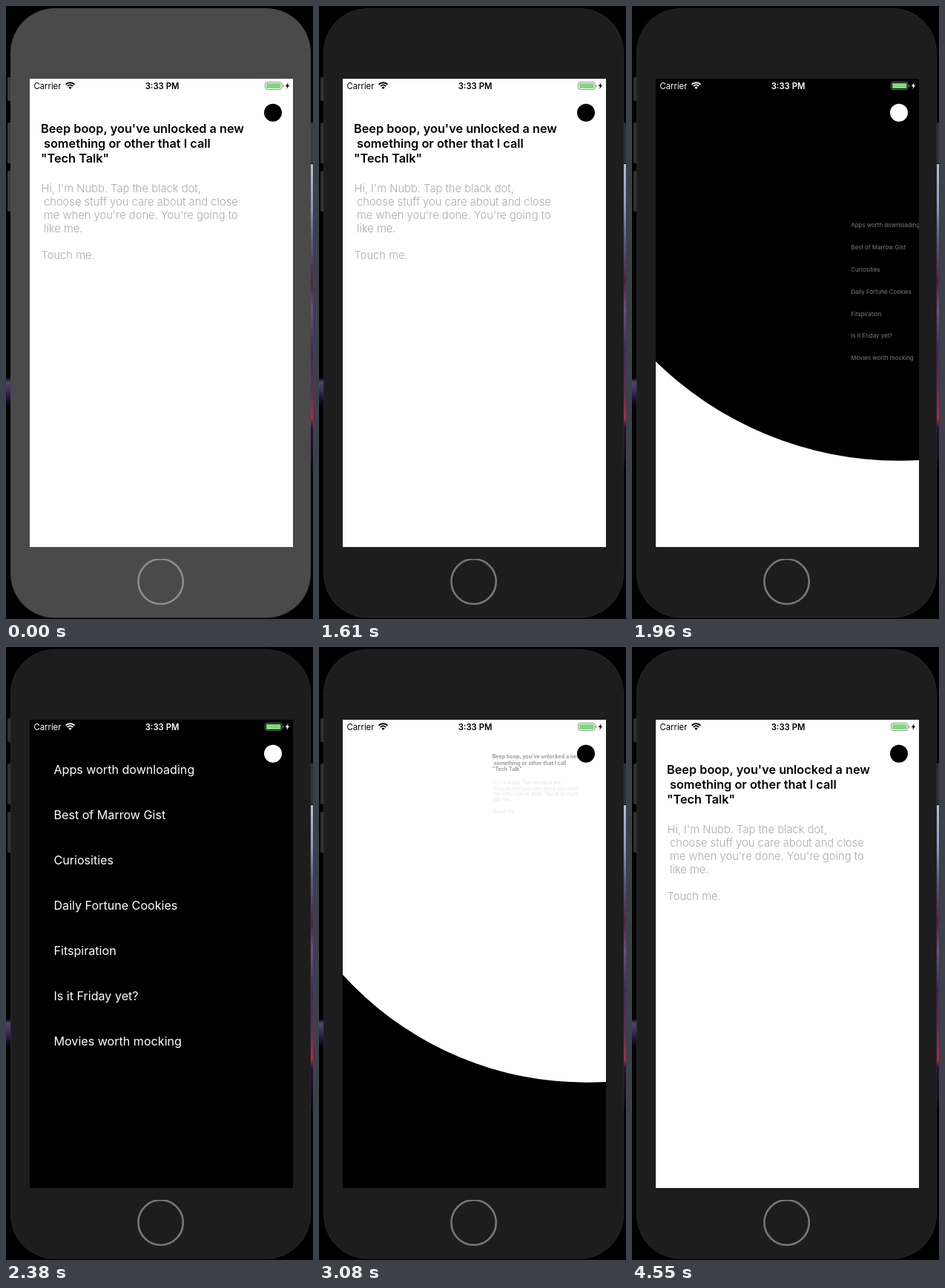
An HTML page with a canvas for the animation above (4.62 s loop, 414 by 826 pixels).

```html
<!DOCTYPE html>
<html lang="en">
<head>
<meta charset="utf-8">
<style>
  html, body { margin: 0; width: 100%; height: 100%; overflow: hidden; background: #000; }
  canvas { display: block; }
</style>
</head>
<body>
<canvas id="stage" width="414" height="826"></canvas>
<script>
const ctx = document.getElementById('stage').getContext('2d');
const LOOP = 4620;
const FOCUS_AT = 1610;
const OPEN_AT = 1802;
const CLOSE_AT = 2934;
const GROW = 350;
const DOT = { x: 360, y: 143.7, r: 12 };
const SCREEN = { x: 32, y: 98, w: 355, h: 631 };
const REACH = Math.hypot(DOT.x - SCREEN.x, SCREEN.y + SCREEN.h - DOT.y);
const FONT = 'Inter, "Open Sans", sans-serif';

const HEADING = ["Beep boop, you've unlocked a new", 'something or other that I call', '"Tech Talk"'];
const BODY = ["Hi, I'm Nubb. Tap the black dot,", 'choose stuff you care about and close',
  "me when you're done. You're going to", 'like me.', '', 'Touch me.'];
const TOPICS = ['Apps worth downloading', 'Best of Marrow Gist', 'Curiosities', 'Daily Fortune Cookies',
  'Fitspiration', 'Is it Friday yet?', 'Movies worth mocking'];

// Each page zooms in from, and back out to, its own fixed point.
const INTRO = { paper: '#fff', ink: '#000', from: { x: 378, y: 133.5 }, content: drawIntro };
const MENU = { paper: '#000', ink: '#fff', from: { x: 516, y: 420 }, content: drawMenu };

function label(text, x, y, size, weight, color, align = 'left') {
  ctx.font = `${weight} ${size}px ${FONT}`;
  ctx.textAlign = align;
  ctx.fillStyle = color;
  ctx.fillText(text, x, y);
}

function box(x, y, w, h, r, color) {
  ctx.beginPath();
  ctx.roundRect(x, y, w, h, r);
  ctx.fillStyle = color;
  ctx.fill();
}

function disc(x, y, r, color) {
  ctx.beginPath();
  ctx.arc(x, y, r, 0, Math.PI * 2);
  ctx.fillStyle = color;
  ctx.fill();
}

function strip(x, y, w, h, stops) {
  const g = ctx.createLinearGradient(0, y, 0, y + h);
  stops.forEach(([at, color]) => g.addColorStop(at, color));
  ctx.fillStyle = g;
  ctx.fillRect(x, y, w, h);
}

function drawIntro() {
  HEADING.forEach((line, i) => label(line, i === 1 ? 51 : 47, 171 + 20 * i, 16.3, 600, '#000'));
  BODY.forEach((line, i) => label(line, i > 0 && i < 4 ? 51 : 47.5, 251 + 18 * i, 14.73, 300, '#aaa'));
}

function drawMenu() {
  TOPICS.forEach((topic, i) => label(topic, 64.5, 171 + 61 * i, 16.1, 400, '#fff'));
}

function drawWifi(color) {
  ctx.strokeStyle = color;
  ctx.lineWidth = 2;
  for (const r of [8.4, 5.1]) {
    ctx.beginPath();
    ctx.arc(86.5, 111.7, r, -Math.PI * 0.75, -Math.PI * 0.25);
    ctx.stroke();
  }
  ctx.beginPath();
  ctx.moveTo(86.5, 112);
  ctx.arc(86.5, 112, 3, -Math.PI * 0.75, -Math.PI * 0.25);
  ctx.fillStyle = color;
  ctx.fill();
}

function drawBattery(color) {
  ctx.beginPath();
  ctx.roundRect(349.5, 102.5, 22.5, 10, 2.5);
  ctx.globalAlpha = 0.42;
  ctx.strokeStyle = color;
  ctx.lineWidth = 1;
  ctx.stroke();
  box(373, 106, 1.3, 3.4, 0.6, color);
  ctx.globalAlpha = 1;
  box(351, 104, 19.5, 7, 1, '#7fda78');
  ctx.beginPath();
  [[380.6, 103], [376.8, 108.2], [379.1, 108.2], [378.3, 112], [382.2, 106.6], [379.8, 106.6]]
    .forEach(([x, y]) => ctx.lineTo(x, y));
  ctx.fillStyle = color;
  ctx.fill();
}

function drawPage(page, scale) {
  ctx.fillStyle = page.paper;
  ctx.fillRect(SCREEN.x, SCREEN.y, SCREEN.w, SCREEN.h);

  ctx.save();
  ctx.globalAlpha = scale;
  ctx.translate(page.from.x * (1 - scale), page.from.y * (1 - scale));
  ctx.scale(scale, scale);
  page.content();
  ctx.restore();

  label('Carrier', 37.5, 111.6, 11.3, 400, page.ink);
  label('3:33 PM', 210.5, 111.6, 11.3, 600, page.ink, 'center');
  drawWifi(page.ink);
  drawBattery(page.ink);
  disc(DOT.x, DOT.y, DOT.r, page.ink);
}

function drawWallpaper() {
  ctx.fillStyle = '#000';
  ctx.fillRect(0, 0, 414, 826);
  strip(0, 502, 8, 38, [[0, '#17102a'], [0.14, '#51456e'], [0.45, '#3a2b5a'], [0.72, '#1a1230'], [1, '#000']]);
  strip(409, 213, 5, 417, [[0, '#b4bad6'], [0.13, '#9298c0'], [0.25, '#5a5688'], [0.38, '#502247'],
    [0.47, '#6c4e88'], [0.6, '#3f2a5e'], [0.73, '#652a58'], [0.82, '#b02a48'], [0.85, '#25143a'],
    [0.95, '#120b26'], [1, '#000']]);
}

function drawPhone(focused) {
  const button = focused ? '#303030' : '#3b3b3b';
  box(2, 96, 8, 32, 2, button);
  box(2, 157, 8, 55, 2, button);
  box(2, 222, 8, 55, 2, button);
  box(408, 157, 8, 55, 2, button);
  box(6, 3, 405, 821.5, 60, focused ? '#272727' : '#484848');
  box(7, 4, 403, 819.5, 59, focused ? '#1d1d1d' : '#4a4a4a');

  ctx.save();
  ctx.beginPath();
  ctx.rect(177, 745, 63, 62);
  ctx.clip();
  ctx.beginPath();
  ctx.arc(208.6, 775.5, 30.2, 0, Math.PI * 2);
  ctx.strokeStyle = focused ? '#777' : '#8c8c8c';
  ctx.lineWidth = 2.6;
  ctx.stroke();
  ctx.restore();
}

function easeOut(elapsed) {
  const u = Math.min(1, Math.max(0, elapsed / GROW));
  return 1 - (1 - u) ** 2;
}

function drawScreen(t) {
  const closing = t >= CLOSE_AT;
  const progress = easeOut(t - (closing ? CLOSE_AT : OPEN_AT));
  const scale = progress * progress;
  const [leaving, arriving] = closing ? [MENU, INTRO] : [INTRO, MENU];
  ctx.save();
  ctx.beginPath();
  ctx.rect(SCREEN.x, SCREEN.y, SCREEN.w, SCREEN.h);
  ctx.clip();
  if (progress < 1) drawPage(leaving, 1 - scale);
  if (progress > 0) {
    if (progress < 1) {
      ctx.beginPath();
      ctx.arc(DOT.x, DOT.y, Math.max(DOT.r, REACH * progress), 0, Math.PI * 2);
      ctx.clip();
    }
    drawPage(arriving, scale);
  }
  ctx.restore();
}

let start;
function frame(now) {
  start ??= now;
  const t = (now - start) % LOOP;
  drawWallpaper();
  drawPhone(t >= FOCUS_AT);
  drawScreen(t);
  requestAnimationFrame(frame);
}
requestAnimationFrame(frame);
</script>
</body>
</html>
```
